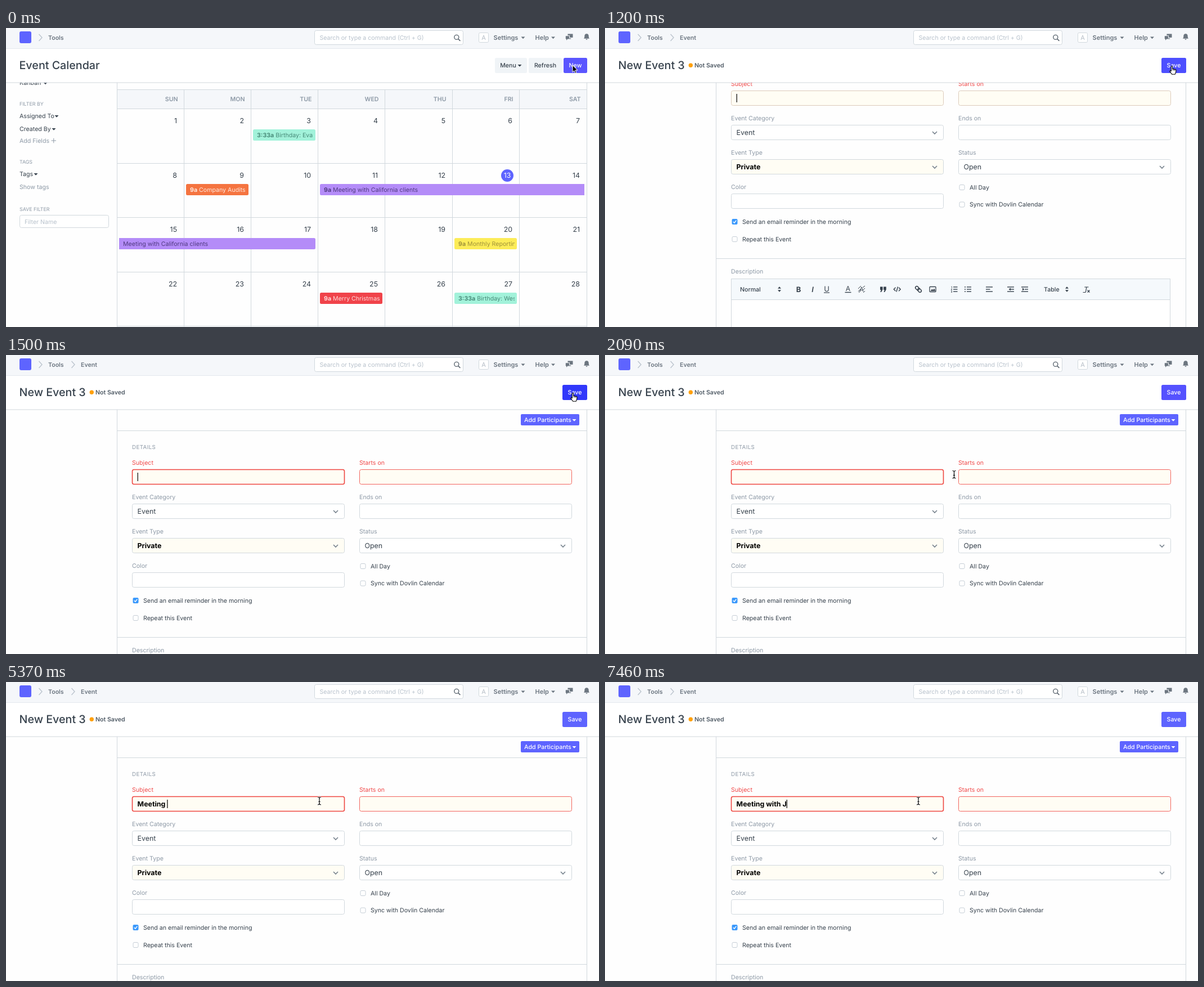
Animation of 1054x531 px, one loop 8 s. Source, as an HTML page:

```html
<!DOCTYPE html>
<html lang="en">
<head>
<meta charset="utf-8">
<title>Event form</title>
<style>
html, body { margin: 0; width: 100%; height: 100%; overflow: hidden; background: #fefefe; }
svg { display: block; }
text {
  font-family: Inter, Roboto, "Open Sans", sans-serif;
  font-optical-sizing: none;
  text-rendering: geometricPrecision;
  white-space: pre;
}
</style>
</head>
<body>
<svg id="stage" width="1054" height="531" viewBox="0 0 1054 531"></svg>
<script>
const LOOP = 8000;
const SMALL = 10.62, FIELD = 12.4;
const INK = '#36414c', MUTED = '#8d99a6', LINE = '#d1d8dd', BRAND = '#5e64ff';
const CREAM = '#fffdf4', RED = '#f04848', NAV = '#6c7680';

// Text placed by its left (or anchored) x and the middle of its capitals.
const text = (x, mid, str, { size = SMALL, fill = INK, weight = 400, anchor = 'start', extra = '' } = {}) =>
  `<text x="${x}" y="${mid + size * 0.36}" font-size="${size}" fill="${fill}" font-weight="${weight}" text-anchor="${anchor}" ${extra}>${str}</text>`;
const rect = (x, y, w, h, fill, stroke = 'none', r = 0, extra = '') =>
  `<rect x="${x}" y="${y}" width="${w}" height="${h}" rx="${r}" fill="${fill}" stroke="${stroke}" ${extra}/>`;
const stroke = (d, color = INK, width = 1, extra = '') =>
  `<path d="${d}" fill="none" stroke="${color}" stroke-width="${width}" ${extra}/>`;
const shape = (d, fill = INK, extra = '') => `<path d="${d}" fill="${fill}" ${extra}/>`;
const group = (id, body, extra = '') => `<g id="${id}" ${extra}>${body}</g>`;
const dropCaret = (x, y, fill = INK) => shape(`M${x - 3.5} ${y - 1.5}h7l-3.5 3.8z`, fill);
const hline = (y, x1 = 197, x2 = 1032.5) => stroke(`M${x1} ${y}H${x2}`, LINE);

// Calendar
const COLS = [197.5, 316.5, 435.5, 554.5, 673.5, 793.5, 912.5, 1032.5];
const ROW_TOP = 143, ROW_H = 96.55;
const rowY = row => Math.round(ROW_TOP + row * ROW_H);

function calendarEvent({ row, from, to = from, time, title, bg, ink, cutLeft, cutRight }) {
  const x = COLS[from] + 3.5, y = rowY(row) + 37;
  const w = COLS[to + 1] - 4.5 - x, r = 2.5;
  const bold = time ? `<tspan font-weight="700">${time}</tspan> ` : '';
  return rect(x, y, w, 20, bg, 'none', r) +
    (cutLeft ? rect(x, y, 6, 20, bg) : '') +
    (cutRight ? rect(x + w - 6, y, 6, 20, bg) : '') +
    `<svg x="${x}" y="${y}" width="${w - 4}" height="20">${text(7, 10.2, bold + title, { fill: ink })}</svg>`;
}

function calendar() {
  let out = rect(197, 109, 835, 34, '#f5f7fa') + hline(109.5);
  'SUN MON TUE WED THU FRI SAT'.split(' ').forEach((day, i) => {
    out += text(COLS[i + 1] - 11, 126.5, day, { fill: MUTED, weight: 600, anchor: 'end' });
  });
  for (let row = 0; row < 5; row++) out += hline(rowY(row) + 0.5);
  COLS.forEach((x, i) => {
    out += stroke(`M${x} ${i % 7 ? 109 : 97}V531`, LINE);
  });
  for (let day = 1; day <= 28; day++) {
    const row = Math.floor((day - 1) / 7), right = COLS[(day - 1) % 7 + 1], mid = rowY(row) + 22;
    const today = day === 13;
    if (today) out += `<circle cx="891" cy="${mid}" r="11" fill="${BRAND}"/>`;
    out += today
      ? text(891, mid, day, { size: FIELD, fill: '#fff', anchor: 'middle' })
      : text(right - 12.5, mid, day, { size: FIELD, anchor: 'end' });
  }
  const teal = { bg: '#a2f2da', ink: '#478a78' };
  const purple = { bg: '#b48cf8', ink: '#503a80' };
  out += [
    { row: 0, from: 2, time: '3:33a', title: 'Birthday: Eva', ...teal },
    { row: 1, from: 1, time: '9a', title: 'Company Audits', bg: '#f57440', ink: '#ffe9df' },
    { row: 1, from: 3, to: 6, time: '9a', title: 'Meeting with California clients', cutRight: true, ...purple },
    { row: 2, from: 0, to: 2, title: 'Meeting with California clients', cutLeft: true, ...purple },
    { row: 2, from: 5, time: '9a', title: 'Monthly Reporting', bg: '#fcec58', ink: '#9f923a' },
    { row: 3, from: 3, time: '9a', title: 'Merry Christmas', bg: '#f0434a', ink: '#ffdcdc' },
    { row: 3, from: 5, time: '3:33a', title: 'Birthday: Wes', ...teal }
  ].map(calendarEvent).join('');

  const heading = { size: 8.85, fill: MUTED }, quiet = { fill: MUTED };
  out += text(24, 97.5, 'Kanban') + dropCaret(70, 98) +
    text(24, 135, 'FILTER BY', heading) +
    text(24, 156, 'Assigned To') + dropCaret(90, 156.5) +
    text(24, 179, 'Created By') + dropCaret(85, 179.5) +
    text(24, 200, 'Add Fields', quiet) + stroke('M80.5 200H89M84.75 195.75V204.25', MUTED) +
    text(24, 238, 'TAGS', heading) +
    text(24, 259, 'Tags') + dropCaret(53, 259.5) +
    text(24, 282, 'Show tags', quiet) +
    text(24, 322, 'SAVE FILTER', heading) +
    rect(24.5, 332.5, 158, 22, '#fff', LINE, 3) +
    text(33, 344, 'Filter Name', { fill: '#b8c2cc' });
  return out;
}

// Form, laid out as it stands when scrolled to its resting place
const LEFT = 224.5, RIGHT = 628.5;

function field(x, y, label, { value, required, select, bold, id = '' } = {}) {
  return text(x - 0.5, y - 12.5, label, { fill: required ? RED : MUTED }) +
    rect(x, y, 377, 26, required || bold ? CREAM : '#fff', LINE, 3, id && `id="${id}"`) +
    (value ? text(x + 9, y + 13.3, value, { size: FIELD, weight: bold ? 700 : 400, fill: bold ? '#000' : INK }) : '') +
    (select ? stroke(`M${x + 357.5} ${y + 11.5}l4 4l4 -4`, '#77828d', 1.6) : '');
}

function checkbox(x, y, label, checked) {
  const box = checked
    ? rect(x - 5, y - 5, 10, 10, '#3b99fc', 'none', 2) + stroke(`M${x - 2.6} ${y}l2 2.2l3.4 -4.6`, '#fff', 1.4)
    : rect(x - 4.5, y - 4.5, 9, 9, '#fff', '#c6ced6', 2);
  return box + text(x + 13.5, y, label);
}

const sorter = (x, y) => shape(`M${x - 3} ${y - 1.2}h6l-3 -3.6zM${x - 3} ${y + 1.2}h6l-3 3.6z`);
// Rows of a list-like icon; each entry is [indent, length].
const bars = (x, y, rows) => rows.map(([dx, len], i) =>
  stroke(`M${x + dx} ${y + (i - (rows.length - 1) / 2) * 4}h${len}`, INK, 1.4)).join('');

function toolbar() {
  const y = 556, icon = { size: 13, anchor: 'middle' };
  const indent = (x, dir) => bars(x - 6, y, [[0, 12], [6, 6], [0, 12]]) +
    shape(`M${x - 2 * dir - 2} ${y - 2.6}v5.2l${3.4 * dir} -2.6z`);
  return rect(LEFT, 537.5, 780, 37, '#f5f9fc', LINE) + rect(LEFT, 574.5, 780, 120, '#fff', LINE) +
    text(240, y, 'Normal', { weight: 500 }) + sorter(310, y) +
    text(344, y, 'B', { ...icon, weight: 700 }) +
    text(369, y, 'I', { ...icon, weight: 600, extra: 'font-style="italic"' }) +
    text(394, y - 0.5, 'U', icon) + stroke(`M389 ${y + 6}h10`, INK, 1.2) +
    text(432, y - 1, 'A', { ...icon, size: 12 }) + stroke(`M426.5 ${y + 5.5}h11`, INK, 1.4) +
    stroke(`M450 ${y - 1}l5 -5M450 ${y + 4}l4 -4M458 ${y - 3}l4 -3M459 ${y + 1}l3 -3M451 ${y + 6}l3 -3M459 ${y + 6}l3 -3`, INK, 1) +
    text(456, y, 'A', { ...icon, size: 11 }) +
    shape(`M489 ${y - 4.5}h4.6v5l-2.6 4.5h-1.6l1.2 -4h-1.6zM495.2 ${y - 4.5}h4.6v5l-2.6 4.5h-1.6l1.2 -4h-1.6z`) +
    stroke(`M516.5 ${y - 3.2}l-3.2 3.2l3.2 3.2M522 ${y - 3.2}l3.2 3.2l-3.2 3.2M520.4 ${y - 4.5}l-2.4 9`, INK, 1.4) +
    `<g transform="rotate(45 557 ${y})">` +
    rect(550.5, y - 2.5, 7.5, 5, 'none', INK, 2.5, 'stroke-width="1.5"') +
    rect(556, y - 2.5, 7.5, 5, 'none', INK, 2.5, 'stroke-width="1.5"') + '</g>' +
    rect(577, y - 4.5, 11, 9, 'none', INK, 1, 'stroke-width="1.3"') +
    shape(`M578.5 ${y + 3}l2.8 -3.6l1.8 2l2 -3l2.2 4.6z`) +
    bars(619, y, [[0, 7.5], [0, 7.5], [0, 7.5]]) +
    [1, 2, 3].map(n => text(616, y + (n - 2) * 4, n, { size: 4.5, weight: 700, anchor: 'middle' })).join('') +
    bars(639, y, [[0, 2], [0, 2], [0, 2]]) + bars(643, y, [[0, 8], [0, 8], [0, 8]]) +
    bars(677, y, [[0, 12], [0, 7.5], [0, 12]]) +
    indent(721, -1) + indent(746, 1) +
    text(780, y, 'Table', { weight: 500 }) + sorter(821, y) +
    text(855, y, 'T', { ...icon, extra: 'font-style="italic"' }) +
    stroke(`M857.5 ${y + 1.5}l4 4m0 -4l-4 4M849.5 ${y + 5.5}h5`, INK, 1.2);
}

function form() {
  return stroke('M197.5 0V700M1032.5 0V700', LINE) + hline(134.5) + hline(501.5) +
    rect(915, 105, 104, 20, BRAND, 'none', 2) +
    text(921, 115, 'Add Participants', { fill: '#fff', weight: 500 }) + dropCaret(1010, 115.5, '#fff') +
    text(224, 163, 'DETAILS', { size: 9.74, fill: MUTED, extra: 'letter-spacing="0.4"' }) +
    field(LEFT, 203.5, 'Subject', { required: true, id: 'subject' }) +
    field(RIGHT, 203.5, 'Starts on', { required: true, id: 'starts' }) +
    field(LEFT, 264.5, 'Event Category', { value: 'Event', select: true }) +
    field(RIGHT, 264.5, 'Ends on') +
    field(LEFT, 325.5, 'Event Type', { value: 'Private', select: true, bold: true }) +
    field(RIGHT, 325.5, 'Status', { value: 'Open', select: true }) +
    field(LEFT, 386.5, 'Color') +
    checkbox(634.5, 375, 'All Day') +
    checkbox(634.5, 405.5, 'Sync with Dovlin Calendar') +
    checkbox(230.5, 436, 'Send an email reminder in the morning', true) +
    checkbox(230.5, 467, 'Repeat this Event') +
    text(224, 524.5, 'Description', { fill: MUTED }) + toolbar() +
    text(233.6, 216.8, '', { size: FIELD, weight: 700, fill: '#000', extra: 'id="typed"' }) +
    rect(0, 209, 1.2, 15, '#000', 'none', 0, 'id="caret"');
}

// Bars at the top
function navbar() {
  const chevron = x => stroke(`M${x - 2.5} 11l5.5 6l-5.5 6`, '#bcc5ce', 1.4);
  const link = { fill: NAV, weight: 600 };
  return rect(0, 0, 1054, 36, '#f5f7fa') + rect(0, 36, 1054, 61, '#fff') +
    stroke('M0 36.5H1054', '#e4e9ed') + stroke('M0 97H1054', LINE, 1.2) +
    rect(24, 6, 21, 21, BRAND, 'none', 3) +
    chevron(61) + text(75, 17.2, 'Tools', link) +
    group('crumb', chevron(119) + text(133, 17.2, 'Event', link)) +
    rect(548.5, 4.5, 264, 25, '#fff', LINE, 3) +
    text(557.5, 17.3, 'Search or type a command (Ctrl + G)', { fill: '#b8c2cc' }) +
    '<circle cx="800.8" cy="16.4" r="4" fill="none" stroke="#5b6670" stroke-width="1.4"/>' +
    stroke('M803.8 19.4l3.6 3.6', '#5b6670', 1.7) +
    rect(840.5, 8.5, 17, 17, '#fff', LINE, 2) +
    text(849, 17, 'A', { size: 11, fill: '#b5bdc6', anchor: 'middle' }) +
    text(866.5, 16.7, 'Settings', { ...link, size: 11 }) + dropCaret(919, 17, NAV) +
    text(940.5, 16.7, 'Help', { ...link, size: 11 }) + dropCaret(972.5, 17, NAV) +
    shape('M998.5 10.5h9v6.5h-5.5v-3.8h-3.5zM994.8 14.2h6.2v4h3.2v1.4h-6l-2.2 2.4v-2.4h-1.2z', NAV) +
    shape('M1032 10.2c2.6 0 3.7 1.8 3.7 4.2c0 2.4 .6 3.4 1.5 4.4h-10.4c.9 -1 1.5 -2 1.5 -4.4c0 -2.4 1.1 -4.2 3.7 -4.2zM1030.5 19.4h3a1.5 1.5 0 0 1 -3 0z', NAV);
}

const title = str => text(23.5, 66, str, { size: 19.7, weight: 500 });
const button = (x, w, label, fill, ink, extra = '') =>
  rect(x, 53, w, 27, fill, 'none', 2.5, extra) +
  text(label === 'Menu' ? x + 23.5 : x + w / 2, 66.3, label, { fill: ink, weight: 500, anchor: 'middle' });

const calendarHead = title('Event Calendar') +
  button(869, 57, 'Menu', '#f0f4f7', INK) + dropCaret(913, 66.5) +
  button(929, 59, 'Refresh', '#f0f4f7', INK) +
  button(991, 42, 'New', '#5b56ff', '#fff');
const formHead = title('New Event 3') +
  '<circle cx="152.3" cy="66.3" r="3.7" fill="#ffa00a"/>' +
  text(159, 66.3, 'Not Saved', { weight: 600, fill: '#4f5a65' }) +
  button(989, 44, 'Save', BRAND, '#fff', 'id="save"');

// Pointers, each drawn around its own hot spot
const outline = 'stroke="#fff" stroke-width="1" stroke-linejoin="round"';
const beamPath = 'M-3 -6.5q2.6 0 3 1.8q.4 -1.8 3 -1.8M0 -4.7V5M-3 7q2.6 0 3 -1.8q.4 1.8 3 1.8M-1.6 1.5h3.2';
const pointers = {
  arrow: shape('M0 0V12.5L2.9 9.8L4.9 14.4L6.9 13.5L4.9 9H8.8z', '#000', outline),
  hand: shape('M-1.2 .8q1.2 -1.6 2.4 0v4.2l5.4 1.2q1.2 .4 1 1.8l-.8 4.2l-1.2 2.6h-5.4l-3.8 -5.2q-.4 -1.4 1 -1.4l1.4 1z', '#fff',
    'stroke="#000" stroke-width="1.1" stroke-linejoin="round"') + stroke('M1.6 5v3M3.6 5.6v2.6M5.5 6v2.4', '#000', 0.8),
  beam: stroke(beamPath, '#fff', 2.6) + stroke(beamPath, '#000', 1.2)
};

document.getElementById('stage').innerHTML =
  group('calendar', calendar()) + group('form', form()) + navbar() +
  group('calendarHead', calendarHead) + group('formHead', formHead) +
  Object.keys(pointers).map(name => group(name, pointers[name])).join('');

const el = id => document.getElementById(id);
const show = (id, on) => el(id).setAttribute('visibility', on ? 'visible' : 'hidden');
const set = (id, attrs) => {
  for (const key in attrs) el(id).setAttribute(key, attrs[key]);
};

// Timed states: [start in ms, value...]; the latest one that has begun holds.
const latest = (states, t) => states.filter(state => state[0] <= t).pop();
const SCROLL = [[0, 92], [1350, 21], [1500, 0]];
const SAVE = [[0, BRAND], [1200, '#4d4fff'], [1350, '#3138fb'], [1940, '#4546ff'], [2090, '#5552ff'], [2240, BRAND]];
const POINTER = [
  [0, 'arrow', 1007, 66], [1050, 'hand', 1007.5, 67.5], [1790, 'hand', 992, 76], [1940, 'arrow', 850, 150],
  [2090, 'beam', 620.5, 212], [2240, 'beam', 575, 212], [2390, 'beam', 557, 211]
];
const CARET = [[0, true], [1790, false], [2540, true], [3280, false], [3580, true], [7160, false], [7460, true]];
const PHRASE = 'Meeting with J';
const KEYS = [3580, 3730, 4030, 4330, 4470, 4770, 4920, 5370, 5820, 5970, 6260, 6410, 6710, 7460];

function render(t) {
  const inForm = t >= 1050, invalid = t >= 1350;
  ['calendar', 'calendarHead'].forEach(id => show(id, !inForm));
  ['form', 'formHead', 'crumb'].forEach(id => show(id, inForm));

  set('form', { transform: `translate(0 ${-latest(SCROLL, t)[1]})` });
  const edge = invalid ? '#f2645f' : t >= 1200 ? '#dccbbb' : LINE;
  set('starts', { stroke: edge });
  set('subject', { stroke: invalid ? '#ee4540' : edge, 'stroke-width': invalid ? 1.6 : 1 });
  set('save', { fill: latest(SAVE, t)[1] });

  const typed = el('typed');
  typed.textContent = PHRASE.slice(0, KEYS.filter(key => key <= t).length);
  const width = typed.textContent ? typed.getComputedTextLength() : 0;
  set('caret', { x: 233.6 + width });
  show('caret', inForm && latest(CARET, t)[1]);

  const [, kind, x, y] = latest(POINTER, t);
  Object.keys(pointers).forEach(name => show(name, name === kind));
  set(kind, { transform: `translate(${x} ${y})` });
}

const start = performance.now();
function tick() {
  render((performance.now() - start) % LOOP);
  requestAnimationFrame(tick);
}
tick();
</script>
</body>
</html>
```
